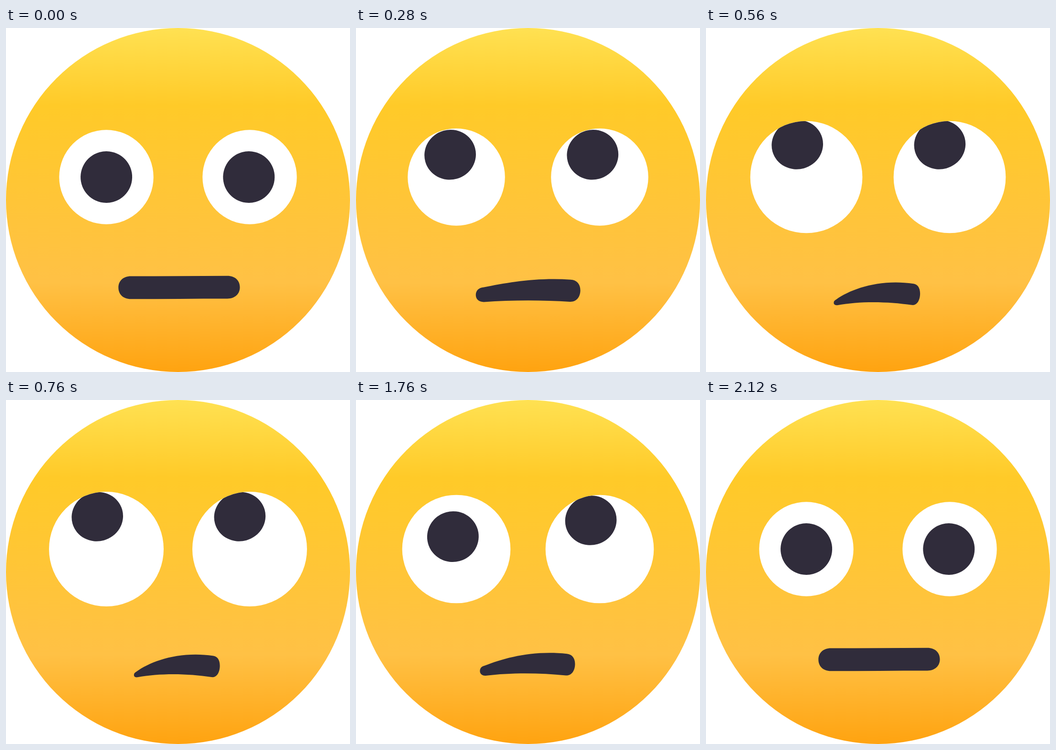
Write an HTML page with a canvas that moves like this. It is 720x720 px and loops after 2400 ms.

```html
<!DOCTYPE html>
<html lang="en">
<head>
<meta charset="utf-8">
<title>Rolling eyes</title>
<style>
  html, body { margin: 0; width: 100%; height: 100%; overflow: hidden; background: #fff; }
  canvas { display: block; width: 100vmin; height: 100vmin; }
</style>
</head>
<body>
<canvas id="stage" width="720" height="720"></canvas>
<script>
const ctx = document.getElementById('stage').getContext('2d');
const LOOP = 2400, STEP = 40, TAU = Math.PI * 2;
const DARK = '#302c3b';
const ROUND = 0.6; // handle length of the mouth's rounded ends

const mix = (a, b, p) => a + (b - a) * p;

// Cubic easing with handles (a, 0) and (b, 1).
function ease(x, a = 1 / 3, b = 1 / 3) {
  if (x <= 0) return 0;
  if (x >= 1) return 1;
  let lo = 0, hi = 1;
  for (let i = 0; i < 30; i++) {
    const s = (lo + hi) / 2, r = 1 - s;
    if (3 * a * s * r * r + 3 * b * s * s * r + s * s * s < x) lo = s;
    else hi = s;
  }
  return lo * lo * (3 - 2 * lo);
}

const ramp = (t, from, to, a, b) => ease((t - from) / (to - from), a, b);

// A corner lies on the upper or lower edge; reach is its handle along that edge.
const corner = (x, y, slope, reach) => ({ x, y, slope, reach });
const along = (c, dx) => [c.x + dx, c.y + dx * c.slope];
const spot = c => [c.x, c.y];

// One rounded end of the mouth, from one corner over the tip to the other.
function cap(from, tip, to) {
  const near = c => along(c, ROUND * (tip.x - c.x));
  const side = c => [tip.x, mix(tip.y, c.y, ROUND)];
  return [near(from), side(from), spot(tip), side(to), near(to), spot(to)];
}

function outline(tl, tr, right, br, bl, left) {
  return [
    spot(tl),
    along(tl, tl.reach), along(tr, -tr.reach), spot(tr),
    ...cap(tr, right, br),
    along(br, -br.reach), along(bl, bl.reach), spot(bl),
    ...cap(bl, left, tl)
  ];
}

const barCorner = (sx, sy) => corner(362.3 + sx * 101, 543 + sy * 23.9 - sx * 0.4, 0, 67);
const flat = outline(
  barCorner(-1, -1), barCorner(1, -1), { x: 489.5, y: 542.6 },
  barCorner(1, 1), barCorner(-1, 1), { x: 235.3, y: 543.3 }
);
const skewed = outline(
  corner(273, 568.5, -0.72, 30), corner(434, 535.5, 0.146, 72), { x: 447.6, y: 556 },
  corner(430.5, 580, 0.152, 50), corner(275, 580.3, -0.187, 47), { x: 267.8, y: 576 }
);

const skin = ctx.createLinearGradient(0, 0, 0, 720);
skin.addColorStop(0, '#ffe152');
skin.addColorStop(0.225, '#ffca28');
skin.addColorStop(0.74, '#ffc145');
skin.addColorStop(1, '#ffa310');

function disc(x, y, r, fill) {
  ctx.beginPath();
  ctx.arc(x, y, r, 0, TAU);
  ctx.fillStyle = fill;
  ctx.fill();
}

function drawEye(x, pupilX, r, up) {
  ctx.save();
  disc(x, 312, r, '#fff');
  ctx.clip();
  ctx.beginPath();
  ctx.ellipse(pupilX - 18.9 * up, 312 - 67.8 * up, 54, 54 - 2.7 * up, -0.27, 0, TAU);
  ctx.fillStyle = DARK;
  ctx.fill();
  ctx.restore();
}

function drawMouth(p) {
  const pts = flat.map(([x, y], i) => [mix(x, skewed[i][0], p), mix(y, skewed[i][1], p)]);
  ctx.beginPath();
  ctx.moveTo(...pts[0]);
  for (let i = 1; i < pts.length; i += 3) ctx.bezierCurveTo(...pts.slice(i, i + 3).flat());
  ctx.fillStyle = DARK;
  ctx.fill();
}

function draw(t) {
  const look = ramp(t, 160, 409);
  const left = look - ramp(t, 1638, 1917);
  const right = look - ramp(t, 1711, 1989);
  const wide = ramp(t, 158, 780) - ramp(t, 1642, 2055);
  const skew = ramp(t, 160, 646, 0.346, 0) - ramp(t, 1640, 2103);
  const r = mix(98.7, 120, wide);

  ctx.clearRect(0, 0, 720, 720);
  disc(360, 360, 360, skin);
  drawEye(210, 210.1, r, left);
  drawEye(510, 508.3, r, right);
  drawMouth(skew);
}

const start = performance.now();
function tick() {
  const t = (performance.now() - start) % LOOP;
  draw(Math.floor(t / STEP) * STEP);
  requestAnimationFrame(tick);
}
tick();
</script>
</body>
</html>
```
